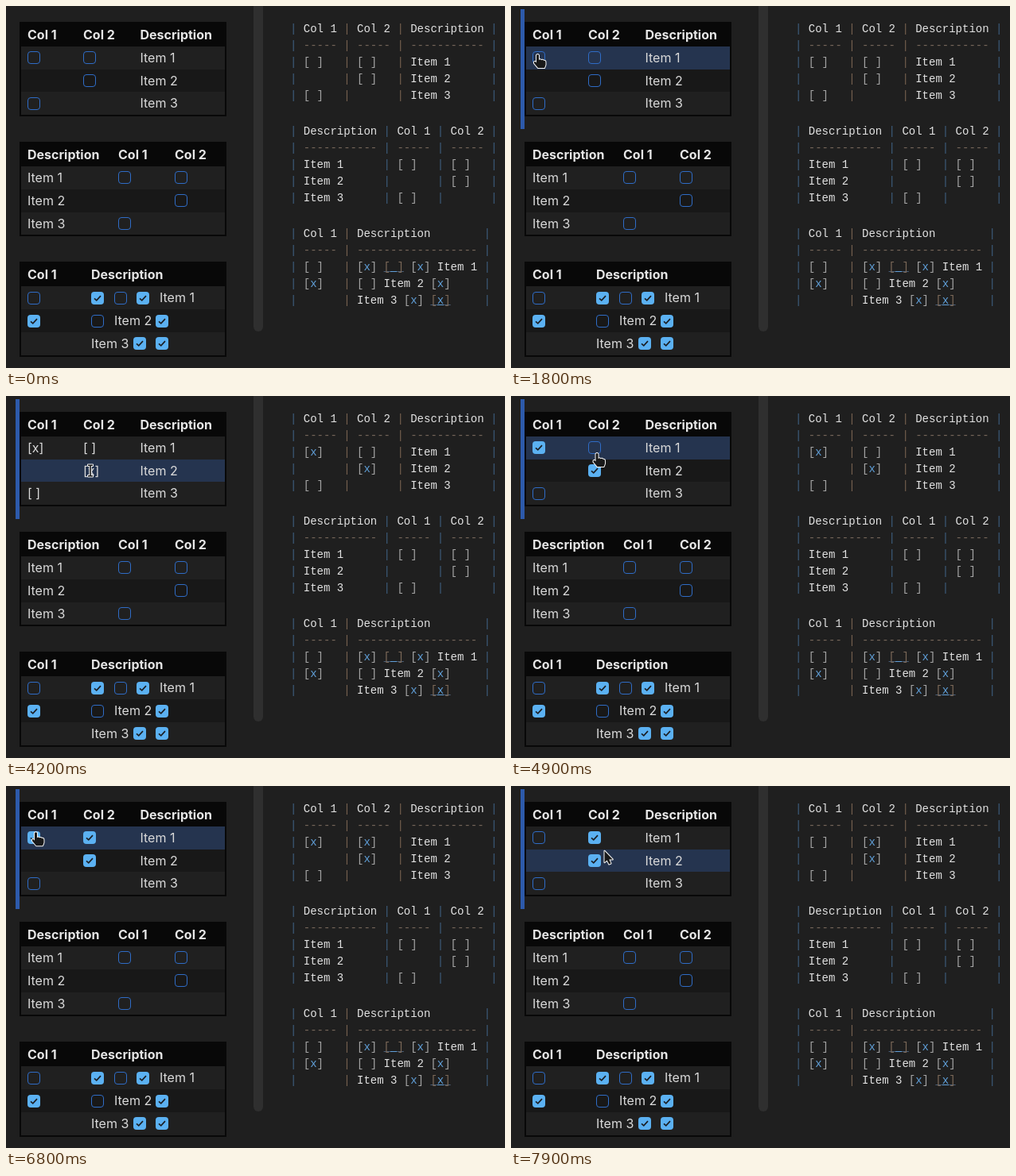
These frames come from a looping animation (627 px wide and 456 px high, 8 s). An HTML page with a canvas:

```html
<!DOCTYPE html>
<html lang="en">
<head>
<meta charset="utf-8">
<title>Checkboxes in tables</title>
<style>
html, body { margin: 0; width: 100%; height: 100%; overflow: hidden; background: #1f1f1f; }
canvas { display: block; }
</style>
</head>
<body>
<canvas id="stage" width="627" height="456"></canvas>
<script>
const ctx = document.getElementById('stage').getContext('2d');
const LOOP = 8000, STEP = 100;
const SANS = '16px Inter, sans-serif', BOLD = '700 ' + SANS;
const MONO = '14px "Liberation Mono", monospace';

// Tables sit on a fractional grid that snaps to whole pixels.
const TOPS = [20, 171.35, 322.7], HEAD = 30.7, ROW = 28.8;
const edgeY = (top, row) => Math.round(top + HEAD + ROW * row);
const boxY = (top, row) => Math.round(top + 45.1 + ROW * row);
const baseY = (top, row) => Math.round(top + 50.7 + ROW * row);

// Each click edits the text; the first row, then the rest, turn back into boxes.
const CLICKS = [1950, 3750, 5300, 6880];
const FIRST_ROW_DELAY = 700, REST_DELAY = 1000;

// Pointer tip: time, x, y
const PATH = [
  [1000, 5, 264], [1400, 16, 150], [1800, 34, 61], [2300, 34, 61],
  [2700, 113, 92], [2900, 113, 92], [3300, 106, 93], [4300, 106, 94],
  [5100, 109, 68], [6000, 109, 68], [6700, 38, 58], [7100, 38, 59],
  [7900, 117, 81], [8000, 117, 81]
];

function pointerAt(t) {
  if (t < PATH[0][0]) return null;
  const i = PATH.findIndex(p => p[0] > t);
  const [t0, x0, y0] = PATH[i - 1], [t1, x1, y1] = PATH[i];
  const k = (t - t0) / (t1 - t0), e = k * k * (3 - 2 * k);
  return { x: x0 + (x1 - x0) * e, y: y0 + (y1 - y0) * e };
}

function rect(x, y, w, h, color) {
  ctx.fillStyle = color;
  ctx.fillRect(x, y, w, h);
}

function text(s, x, y, font = SANS, color = '#dadada') {
  ctx.font = font;
  ctx.fillStyle = color;
  ctx.fillText(s, x, y);
}

function checkbox(x, y, on) {
  ctx.beginPath();
  if (on) {
    ctx.roundRect(x - 8, y - 8, 16, 16, 4);
    ctx.fillStyle = '#5bb1f2';
    ctx.fill();
    ctx.beginPath();
    ctx.moveTo(x - 4, y + .3);
    ctx.lineTo(x - 1.2, y + 2.8);
    ctx.lineTo(x + 4, y - 2.8);
    ctx.strokeStyle = '#1c1f24';
    ctx.lineWidth = 1.7;
  } else {
    ctx.roundRect(x - 7.5, y - 7.5, 15, 15, 3.5);
    ctx.strokeStyle = '#2f6cc6';
    ctx.lineWidth = 1;
  }
  ctx.stroke();
}

function table(top, heads, itemXs, hovered = -1) {
  const y = Math.floor(top);
  rect(17, y, 260, edgeY(top, 3) + 2 - y, '#080808');
  for (const [s, x] of heads) text(s, x, y + 22, BOLD, '#e6e6e6');
  itemXs.forEach((x, i) => {
    const color = i === hovered ? '#25344f' : i === 1 ? '#181818' : '#202020';
    rect(19, edgeY(top, i), 256, edgeY(top, i + 1) - edgeY(top, i), color);
    text('Item ' + (i + 1), x, baseY(top, i));
  });
}

// Braces stand for link brackets.
function codeLine(line, y) {
  [...line].forEach((c, i) => {
    const x = 357 + i * 8.4, prev = line[i - 1], mid = x + 4.2;
    const linked = prev === '{', brace = '{}'.includes(c);
    let color = '#e2e2e2';
    // Thin bars take a cool or warm fringe from where they fall on the pixel grid.
    if (c === '|') color = Math.abs(mid - Math.round(mid)) < .3 ? '#3d5d7d' : '#75604f';
    else if (c === '-') color = '#75665a';
    else if ('[]'.includes(c)) color = '#a4a4a4';
    else if (brace) color = '#7a6858';
    else if (prev === '[' || linked) color = '#609fd8';
    if (brace || linked) rect(x, y + 1, 8.4, 1, linked ? '#609fd8' : '#4c6078');
    text(c === '{' ? '[' : c === '}' ? ']' : c, x, y, MONO, color);
  });
}

function code(top, lines) {
  lines.forEach((line, i) => codeLine(line, top + i * 21));
}

const SHAPES = {
  arrow: new Path2D('M.5.8V15.3L3.7 12.4 6.2 17.6 8.6 16.6 6.3 11.5H10.8Z'),
  hand: new Path2D('M-2 1Q-.5-1 1 1V7Q3 5.5 4 7.2 6 6 7 7.8 9.5 7 9.5 10V13Q9 15 8 17H0L-5 11Q-5.5 8.5-3.5 9L-2 10.5Z'),
  beam: new Path2D('M-3-7.5H3V-6H.8V6H3V7.5H-3V6H-.8V-6H-3Z')
};

function pointer(p, kind) {
  ctx.save();
  ctx.translate(p.x, p.y);
  ctx.lineJoin = 'round';
  ctx.strokeStyle = '#f4f4f4';
  ctx.lineWidth = 2;
  ctx.stroke(SHAPES[kind]);
  ctx.fillStyle = '#191919';
  ctx.fill(SHAPES[kind]);
  ctx.restore();
}

function draw(t) {
  const after = n => t >= CLICKS[n];
  const cells = [
    { x: 35, row: 0, on: after(0) && !after(3) },
    { x: 105, row: 0, on: after(2) },
    { x: 105, row: 1, on: after(1) },
    { x: 35, row: 2, on: false }
  ];
  const age = t - Math.max(...CLICKS.filter(c => c <= t));
  const asText = cell => age < (cell.row ? REST_DELAY : FIRST_ROW_DELAY);
  const mark = i => cells[i].on ? '[x]' : '[ ]';

  const [top1, top2, top3] = TOPS;
  const p = pointerAt(t);
  const inBlock = p && p.x > 12 && p.x < 300 && p.y < 155;
  const hovered = inBlock && p.x > 17 && p.x < 277
    ? Math.floor((p.y - top1 - HEAD) / ROW) : -1;

  rect(0, 0, 627, 456, '#1f1f1f');
  ctx.beginPath();
  ctx.roundRect(311, -10, 12, 420, 6);
  ctx.fillStyle = '#2f2f2f';
  ctx.fill();

  if (inBlock) rect(12, 4, 5, 151, '#2d5aab');
  table(top1, [['Col 1', 27], ['Col 2', 97], ['Description', 168.5]],
    [168.5, 168.5, 168.5], hovered);
  cells.forEach((cell, i) => {
    if (asText(cell)) text(mark(i), cell.x - 8, baseY(top1, cell.row));
    else checkbox(cell.x, boxY(top1, cell.row), cell.on);
  });

  table(top2, [['Description', 27], ['Col 1', 141], ['Col 2', 212]], [27, 27, 27]);
  [[149, 0], [220, 0], [220, 1], [149, 2]]
    .forEach(([x, row]) => checkbox(x, boxY(top2, row), false));

  table(top3, [['Col 1', 27], ['Description', 107]], [193, 136, 107]);
  [[35, 0, 0], [115, 0, 1], [144, 0, 0], [172, 0, 1], [35, 1, 1],
    [115, 1, 0], [196, 1, 1], [168, 2, 1], [196, 2, 1]]
    .forEach(([x, row, on]) => checkbox(x, boxY(top3, row), on));

  code(33, [
    '| Col 1 | Col 2 | Description |',
    '| ----- | ----- | ----------- |',
    `| ${mark(0)}   | ${mark(1)}   | Item 1      |`,
    `|       | ${mark(2)}   | Item 2      |`,
    `| ${mark(3)}   |       | Item 3      |`
  ]);
  code(162, [
    '| Description | Col 1 | Col 2 |',
    '| ----------- | ----- | ----- |',
    '| Item 1      | [ ]   | [ ]   |',
    '| Item 2      |       | [ ]   |',
    '| Item 3      | [ ]   |       |'
  ]);
  code(291, [
    '| Col 1 | Description        |',
    '| ----- | ------------------ |',
    '| [ ]   | [x] { } [x] Item 1 |',
    '| [x]   | [ ] Item 2 [x]     |',
    '|       | Item 3 [x] {x}     |'
  ]);

  if (p) {
    const over = cells.find(c =>
      Math.abs(p.x - c.x) < 8 && Math.abs(p.y - boxY(top1, c.row)) < 8);
    pointer(p, !over ? 'arrow' : asText(over) ? 'beam' : 'hand');
  }
}

function tick() {
  draw(Math.floor(performance.now() % LOOP / STEP) * STEP);
  requestAnimationFrame(tick);
}
tick();
</script>
</body>
</html>
```
